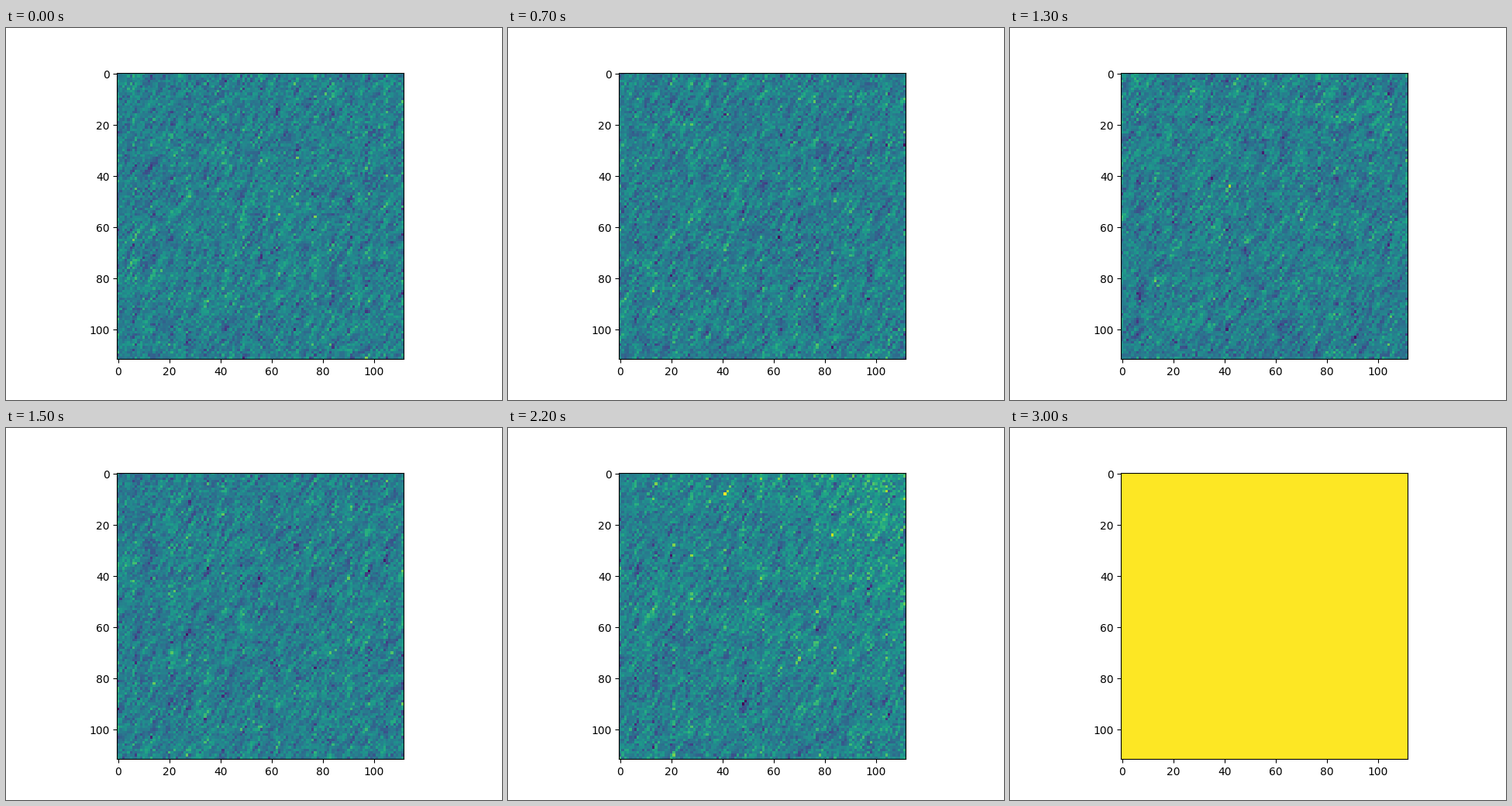
These frames come from a looping animation (640 px wide and 480 px high, 4900 ms). A matplotlib script:

```python
import numpy as np
import matplotlib.pyplot as plt
from matplotlib.animation import FuncAnimation

SIZE = 112
FRAMES = 49
LAST_STEP = 30
INTERVAL = 100

BASE = 0.43
NOISE = 0.083
GROWTH = 2.37        # signal gain per step
UNIT_STEP = 26       # step at which the gain is one

y, x = np.mgrid[:SIZE, :SIZE]
ramp = 0.29 * np.exp((1.14 * x - 0.86 * y) / 47)
column_gain = np.where(np.isin(x % 7, (0, 6)), 1.35, 0.95)


def streaked_noise(seed):
    """Unit noise correlated along steep rising diagonals."""
    white = np.random.default_rng(seed).standard_normal((SIZE, SIZE))
    mixed = (white
             + 0.4 * np.roll(white, (1, -1), (0, 1))
             + 0.35 * np.roll(white, (2, -1), (0, 1))
             + 0.2 * np.roll(white, (3, -2), (0, 1)))
    return mixed / mixed.std()


def field(step):
    noise = streaked_noise(100 + step) * column_gain
    signal = ramp * GROWTH ** (step - UNIT_STEP)
    return BASE + NOISE * noise + signal * (1 + 0.18 * noise)


fig, ax = plt.subplots(figsize=(6.4, 4.8), dpi=100)
image = ax.imshow(field(0), cmap="viridis", vmin=0, vmax=1)


def update(frame):
    step = min(frame, LAST_STEP)
    image.set_data(field(step) if step < LAST_STEP else np.ones((SIZE, SIZE)))
    return (image,)


anim = FuncAnimation(fig, update, frames=FRAMES, interval=INTERVAL,
                     repeat=True, repeat_delay=0)
plt.show()
```
